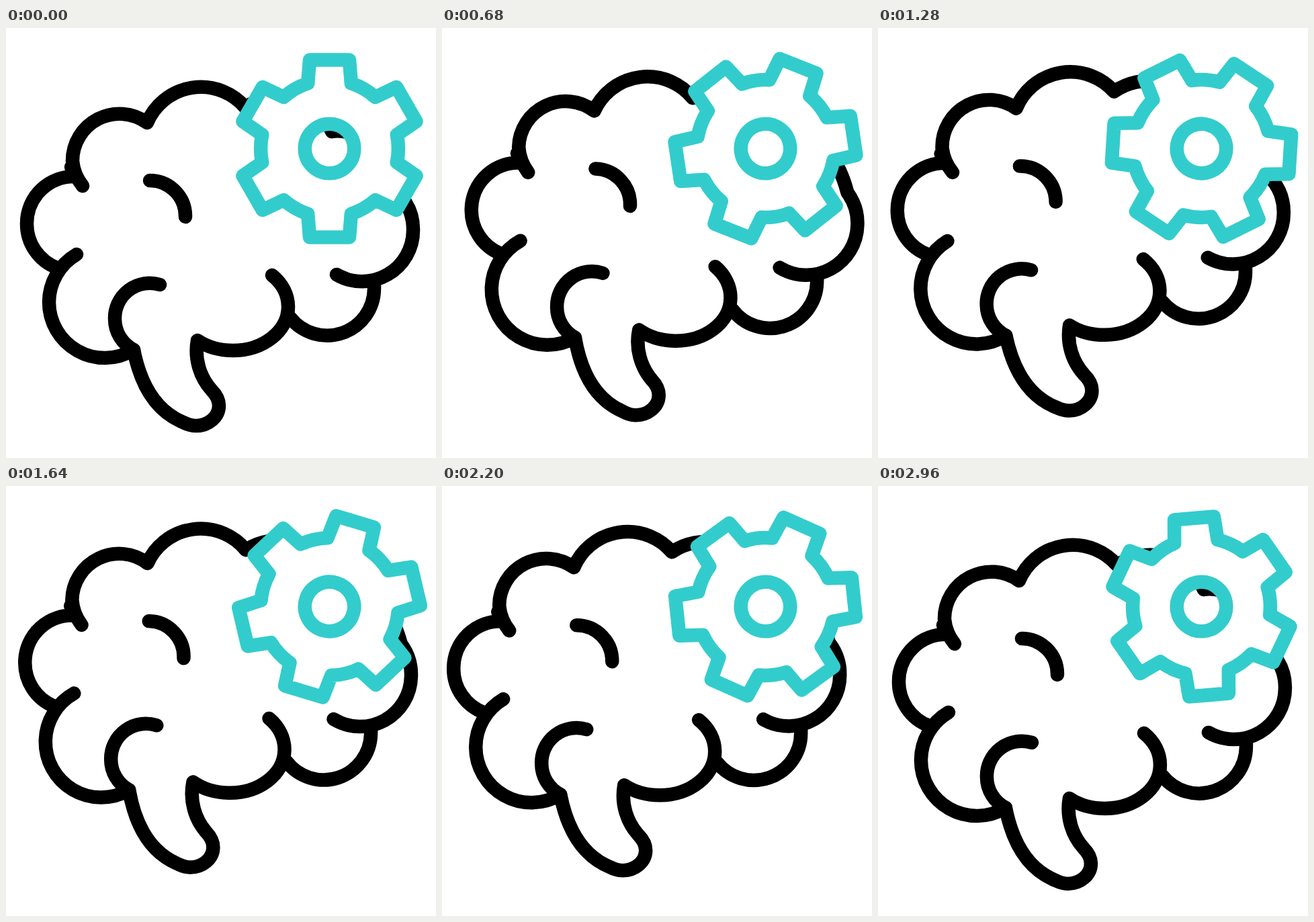
These frames come from a looping animation (640x640 px, 3 s). An HTML page:

```html
<!DOCTYPE html>
<html lang="en">
<head>
<meta charset="utf-8">
<title>Thinking brain</title>
<style>
  html, body { margin: 0; width: 100%; height: 100%; overflow: hidden; background: #fff; }
  svg { display: block; width: 100vw; height: 100vh; }
  path, circle { fill: none; stroke-width: 20.5; stroke-linecap: round; stroke-linejoin: round; }
  #brain path { stroke: #000; }
  #gear path, #gear circle { stroke: #3cc; }
  #gear .body { fill: #fff; fill-rule: evenodd; stroke: none; }
</style>
</head>
<body>
<svg viewBox="0 0 640 640">
  <g id="brain">
    <!-- outer lobes, clockwise from the left -->
    <path d="M76 357A70 70 0 0 1 31 291A70 70 0 0 1 104 221M97 207h.01"/>
    <path d="M114 235A70 70 0 0 1 99 198A70 70 0 0 1 210 141A87 87 0 0 1 356 118A87.5 87.5 0 0 1 485 154"/>
    <path d="M485 154C525 147 572 190 590 253A76 76 0 0 1 606 301A76 76 0 0 1 492 367"/>
    <path d="M548 381V388A70 70 0 0 1 423 431"/>
    <!-- lower lobe, stem and inner lobe -->
    <path d="M396 368C411 380 420 397 420 415C420 451 383 480 338 480C318 480 300 475 285 465C280 493 289 520 306 539C313 546 317 554 317 562C317 579 301 592 283 592C277 592 270 590 264 587C225 571 201 535 190 479A52 52 0 0 1 162 433A52 52 0 0 1 229 382"/>
    <path d="M190 479A83 83 0 0 1 64 408A83 83 0 0 1 105 337"/>
    <path d="M214 227A53 53 0 0 1 267 281"/>
  </g>
  <g id="gear">
    <path class="body"/>
    <path class="rim"/>
    <circle r="36.75"/>
  </g>
</svg>
<script>
const LOOP = 3000, STEP = 40;
const brain = document.getElementById('brain');
const gear = document.getElementById('gear');

function gearOutline(teeth) {
  const root = 102.4, rootAngle = 18.4, tip = 135.3, tipAngle = 12.6;
  const point = (radius, degrees) => {
    const a = degrees * Math.PI / 180;
    return `${(radius * Math.sin(a)).toFixed(2)} ${(-radius * Math.cos(a)).toFixed(2)}`;
  };
  const arc = `A${root} ${root} 0 0 1 `;
  let d = '';
  for (let i = 0; i < teeth; i++) {
    const mid = i * 360 / teeth;
    d += (i ? arc : 'M') + point(root, mid - rootAngle) +
      'L' + point(tip, mid - tipAngle) +
      'L' + point(tip, mid + tipAngle) +
      'L' + point(root, mid + rootAngle);
  }
  return d + arc + point(root, -rootAngle) + 'Z';
}

const outline = gearOutline(6);
gear.querySelector('.rim').setAttribute('d', outline);
gear.querySelector('.body').setAttribute('d',
  outline + 'M36.75 0A36.75 36.75 0 1 0 -36.75 0A36.75 36.75 0 1 0 36.75 0Z');

const ease = u => (1 - Math.cos(Math.PI * u)) / 2;

// The brain rocks left and right about its stem, turning back at these times.
const SWING = 3.1, turns = [0, 430, 810, 1150, 1460, 1780];

function tilt(t) {
  const last = turns.length - 1;
  if (t >= turns[last]) return 0;
  const angle = i => i % last ? SWING * (-1) ** i : 0;
  const i = turns.findIndex(end => end > t) - 1;
  const u = (t - turns[i]) / (turns[i + 1] - turns[i]);
  return angle(i) + (angle(i + 1) - angle(i)) * ease(u);
}

// It also floats along a smooth path and then settles back.
const path = [
  { t: 0, x: 0, y: 0 },
  { t: 680, x: 6.5, y: -16 },
  { t: 1280, x: 1, y: -22.3 },
  { t: 1640, x: -8, y: -24.7 },
  { t: 2080, x: -14.4, y: -20.6 }
];

function drift(t, axis) {
  const last = path.length - 1, end = path[last];
  if (t >= end.t) return end[axis] * (1 - ease((t - end.t) / (LOOP - end.t)));
  const slope = k => k % last
    ? (path[k + 1][axis] - path[k - 1][axis]) / (path[k + 1].t - path[k - 1].t) : 0;
  const i = path.findIndex(p => p.t > t) - 1;
  const a = path[i], b = path[i + 1], span = b.t - a.t;
  const u = (t - a.t) / span, v = 1 - u;
  return a[axis] * v * v * (1 + 2 * u) + b[axis] * u * u * (1 + 2 * v) +
    span * u * v * (slope(i) * v - slope(i + 1) * u);
}

function draw(now) {
  const t = Math.floor((now + 4) / STEP) * STEP % LOOP;
  brain.setAttribute('transform',
    `translate(${drift(t, 'x')} ${drift(t, 'y')}) rotate(${tilt(t)} 275 532)`);
  gear.setAttribute('transform', `translate(481.5 179.5) rotate(${360 * t / LOOP})`);
}

function tick() {
  draw(performance.now());
  requestAnimationFrame(tick);
}
tick();
</script>
</body>
</html>
```
